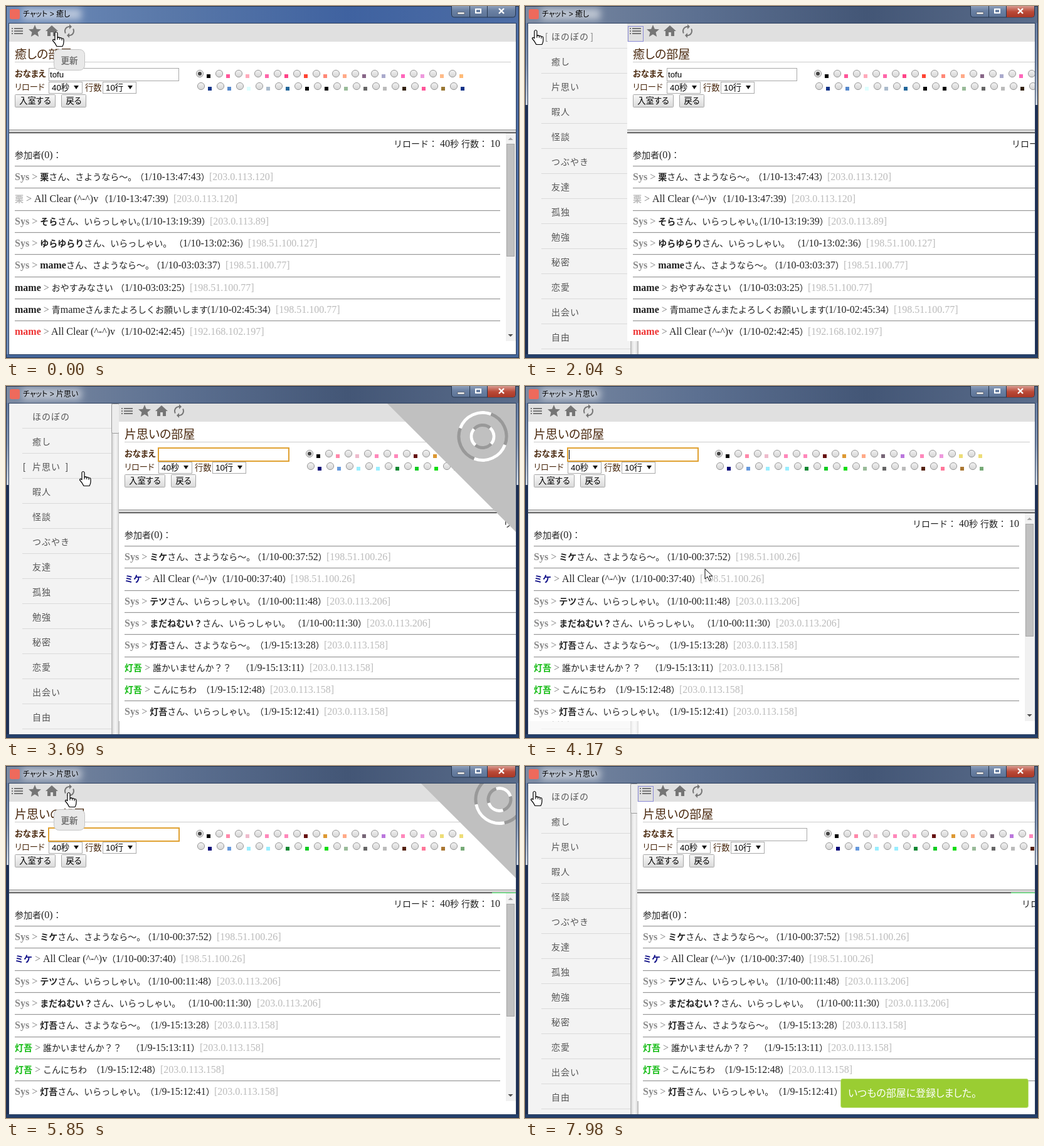
An HTML page for the animation above (8000 ms loop, 818 by 562 pixels).

```html
<!DOCTYPE html>
<html lang="ja">
<head>
<meta charset="utf-8">
<title>チャット</title>
<style>
html, body { margin: 0; width: 100%; height: 100%; overflow: hidden; background: #fff; }
svg { display: block; width: 818px; height: 562px; }
text { white-space: pre; font: 13.3px 'Liberation Sans', 'Noto Sans CJK JP', 'Noto Sans CJK', sans-serif; font-feature-settings: "palt"; }
.log text { font: 16px 'Liberation Serif', 'Noto Sans CJK JP', 'Noto Sans CJK', serif; fill: #222; }
.b { font-weight: bold; }
.side text { font-size: 14px; letter-spacing: 1px; fill: #555; font-feature-settings: normal; }
.tip text { font-weight: bold; font-size: 13.5px; fill: #777; text-anchor: middle; }
</style>
</head>
<body>
<svg id="stage" viewBox="0 0 818 562"></svg>
<script>
const LOOP = 8000, OPEN = 175;
const rooms = ['ほのぼの', '癒し', '片思い', '暇人', '怪談', 'つぶやき', '友達', '孤独', '勉強', '秘密', '恋愛', '出会い', '自由'];
const bye = 'さん、さようなら～。', hello = 'さん、いらっしゃい。', clear = 'All Clear (^-^)v';

// speaker (empty = system), speaker colour, greeted name, text, time, address, address x
const pages = [
  { room: '癒し', name: 'tofu',
    colors: ['000 f59 fab f6a f48 f43 f87 fa8 868 aac f6b e9d fb8 fb7', '138 58c dff abc 269 000 000 9b9 666 bbb 321 f59 973 138'],
    log: [
      ['', '', '栗', bye, '1/10-13:47:43', '203.0.113.120', 324],
      ['栗', '#bbb', '', clear, '1/10-13:47:39', '203.0.113.120', 267],
      ['', '', 'そら', hello, '1/10-13:19:39', '203.0.113.89', 325],
      ['', '', 'ゆらゆらり', hello, '1/10-13:02:36', '198.51.100.127', 386],
      ['', '', 'mame', bye, '1/10-03:03:37', '198.51.100.77', 350],
      ['mame', '#222', '', 'おやすみなさい', '1/10-03:03:25', '198.51.100.77', 293],
      ['mame', '#222', '', '青mameさんまたよろしくお願いします', '1/10-02:45:34', '198.51.100.77', 430],
      ['mame', '#e33', '', clear, '1/10-02:42:45', '192.168.102.197', 293]] },
  { room: '片思い', name: '',
    colors: ['000 f8a ebc f8b f8b 611 d93 fa8 767 b7d f8b e9d ed7 ed7', '007 69d 9ef 9ef 183 1c2 1d1 9b9 666 bbb 521 f79 a73 7a7'],
    log: [
      ['', '', 'ミケ', bye, '1/10-00:37:52', '198.51.100.26', 336],
      ['ミケ', '#118', '', clear, '1/10-00:37:40', '198.51.100.26', 279],
      ['', '', 'テツ', hello, '1/10-00:11:48', '203.0.113.206', 336],
      ['', '', 'まだねむい？', hello, '1/10-00:11:30', '203.0.113.206', 400],
      ['', '', '灯吾', bye, '1/9-15:13:28', '203.0.113.158', 332],
      ['灯吾', '#1b1', '', '誰かいませんか？？', '1/9-15:13:11', '203.0.113.158', 309],
      ['灯吾', '#1b1', '', 'こんにちわ', '1/9-15:12:48', '203.0.113.158', 246],
      ['', '', '灯吾', hello, '1/9-15:12:41', '203.0.113.158', 332]] }
];

const rect = (x, y, w, h, fill, more = '') => `<rect x="${x}" y="${y}" width="${w}" height="${h}" fill="${fill}" ${more}/>`;
const text = (x, y, s, more = '') => `<text x="${x}" y="${y}" ${more}>${s}</text>`;
const path = (d, more) => `<path d="${d}" ${more}/>`;
// Japanese runs are set smaller than the Latin serif around them
const mixed = s => s.replace(/[^\x00-\x7f]+/g, run => `<tspan font-size="14px">${run}</tspan>`);
const span = (s, fill, bold) => `<tspan fill="${fill}" ${bold ? 'class="b"' : ''}>${mixed(s)}</tspan>`;
const brown = 'fill="#4b2a10"';

const icons = [
  [6, 'M3 13h2v-2H3zm0 4h2v-2H3zm0-8h2V7H3zm4 4h14v-2H7zm0 4h14v-2H7zM7 7v2h14V7z'],
  [34, 'M12 17.27L18.18 21l-1.64-7.03L22 9.24l-7.19-.61L12 2 9.19 8.63 2 9.24l5.46 4.73L5.82 21z'],
  [61, 'M10 20v-6h4v6h5v-8h3L12 3 2 12h3v8z'],
  [89, 'M12 6v3l4-4-4-4v3c-4.42 0-8 3.58-8 8 0 1.57.46 3.03 1.24 4.26L6.7 14.8c-.45-.83-.7-1.79-.7-2.8 0-3.31 2.69-6 6-6zm6.76 1.74L17.3 9.2c.44.84.7 1.79.7 2.8 0 3.31-2.69 6-6 6v-3l-4 4 4 4v-3c4.42 0 8-3.58 8-8 0-1.57-.46-3.03-1.24-4.26z']
];

function select(x, label) {
  return rect(x + .5, 121.5, 53, 18, '#fff', 'stroke="#aaa"') + text(x + 5, 135, label) +
    path(`M${x + 40} 127h8l-4 6z`, 'fill="#111"');
}
function button(x, w, label) {
  return rect(x + .5, 141.5, w, 20, 'url(#btn)', 'stroke="#a5a5a5" rx="1"') +
    text(x + w / 2 + .5, 156, label, 'text-anchor="middle"');
}
function radios(row, list) {
  return list.split(' ').map((c, i) => {
    const x = 309 + row * 2 + i * 31, y = 108 + row * 20;
    return `<circle cx="${x}" cy="${y}" r="5.6" fill="url(#radio)" stroke="#999"/>` +
      (row + i ? '' : `<circle cx="${x}" cy="${y}" r="3" fill="#444"/>`) + rect(x + 11, y + 1, 6, 6, '#' + c);
  }).join('');
}
function message([who, color, name, body, time, ip, x], i) {
  const hr = Math.round(255 + i * 35.33), y = hr + 22.5, start = x - (time.length > 12 ? 104 : 96);
  return rect(14, hr, 774, 1, '#999') + rect(14, hr + 1, 774, 1, '#e9e9e9') +
    text(14, y, span(who || 'Sys', color || '#888', true) + span(' &gt; ', '#777') + span(name, '#222', true) + mixed(body)) +
    text(start, y, mixed('（'), 'text-anchor="end"') + text(start, y, mixed(time + '）')) +
    text(x, y, `[${ip}]`, 'style="fill:#bbb"');
}
function page(p, i) {
  return `<g id="page${i}">` + text(14, 84, p.room + 'の部屋', `${brown} style="font-size:19px;font-weight:500"`) +
    text(70, 114, p.name) + radios(0, p.colors[0]) + radios(1, p.colors[1]) +
    `<g class="log">${p.log.map(message).join('')}</g></g>`;
}
function tip(id, x, w, label) {
  return `<g id="${id}" class="tip">` + rect(x, 69.5, w, 33, '#e9e9e9', 'rx="8" stroke="#c4c4c4"') +
    text(x + w / 2, 91.5, label) + '</g>';
}
function ring(id, r, w) {
  const q = r * Math.PI / 2;
  return `<g id="${id}" fill="none" stroke-width="${w}"><circle r="${r}" stroke="#999"/>` +
    `<circle r="${r}" stroke="#fff" stroke-dasharray="${q} ${q}"/></g>`;
}
function gradient(id, dir, ...stops) {
  return `<linearGradient id="${id}" x1="0" y1="0" x2="${dir ? 0 : 1}" y2="${dir}">` +
    stops.map((c, i) => `<stop offset="${i / (stops.length - 1)}" stop-color="${c}"/>`).join('') + '</linearGradient>';
}
const edge = x => rect(x, 27, 5, 131, 'url(#haze)') + rect(x, 158, 5, 404, '#1d2f55');
function chrome(id, active) {
  return `<g id="${id}">` + rect(0, 0, 818, 562, active ? 'url(#aero2)' : 'url(#aero1)') +
    (active ? edge(0) + edge(813) : '') +
    rect(0, 556, 818, 6, active ? '#24406c' : '#45679b') +
    rect(.5, .5, 817, 561, 'none', 'stroke="#22324e"') + rect(4.5, 27.5, 809, 529, 'none', 'stroke="#2d405f"') +
    rect(710.5, -4, 102, 22, 'url(#glass)', 'rx="4" stroke="#26374f"') +
    (active ? path('M767 0h45v14q0 4-4 4h-41z', 'fill="url(#close)"') : '') +
    path('M739.5 0v18M767.5 0v18', 'stroke="#26374f"') + '</g>';
}

const scrollArrow = (y, d, fill) => path(`M800.5 ${y}h8l-4 ${d}z`, `fill="${fill}"`);

stage.innerHTML = `<defs>
${gradient('aero1', 0, '#6f8cb8', '#5877a8', '#3f62a0', '#4d6da5')}
${gradient('aero2', 0, '#7c8ba3', '#5c7091', '#435676', '#5a6c8a')}
${gradient('haze', 1, '#667da2', '#8598b6', '#cdd6e2')}
${gradient('glass', 1, '#a3b2c8', '#6c82a4', '#5b7296')}
${gradient('close', 1, '#d79a90', '#bb4a38', '#a83826')}
${gradient('btn', 1, '#f8f8f8', '#dadada')}
${gradient('radio', 1, '#f2f2f2', '#d4d4d4')}
${gradient('track', 0, '#b4b4b4', '#e8e8e8', '#f4f4f4', '#e8e8e8', '#b0b0b0')}
<clipPath id="view">${rect(5, 28, 808, 528, '#fff')}</clipPath>
<filter id="soft" x="-20%" y="-100%" width="140%" height="300%"><feGaussianBlur stdDeviation="6"/></filter>
</defs>
${chrome('idle', false)}${chrome('active', true)}
${rect(26, 4, 94, 18, '#fff', 'opacity=".55" filter="url(#soft)"')}
${rect(6, 5, 16, 16, '#ee6a5c', 'rx="3"')}
<text id="caption" x="27" y="17" style="font-size:12px"></text>
${rect(720, 10, 11, 3, '#fff', 'stroke="#444" stroke-width=".6"')}
${rect(749, 5, 8, 6, 'none', 'stroke="#fff" stroke-width="2"')}
${path('M786 4l8 8m0-8l-8 8', 'stroke="#fff" stroke-width="2.4"')}
<g clip-path="url(#view)">
  ${rect(5, 28, 808, 528, '#fff')}
  <g id="side" class="side">
    ${rect(5, 28, 164, 528, '#f3f3f3')}
    ${rooms.map((r, i) => text(42, 53.5 + i * 40, r) + rect(26, 67 + i * 40, 142, 1, '#dadada')).join('')}
    <text id="left">[</text><text id="right">]</text>
    ${rect(168, 28, 13, 528, 'url(#track)')}${rect(168.5, 28.5, 12, 47, '#ededed', 'rx="2" stroke="#999"')}
  </g>
  <g id="main">
    ${rect(5, 28, 808, 507, '#fff')}${rect(5, 28, 808, 29, '#e0e0e0')}
    ${icons.map(([x, d]) => path(d, `transform="translate(${x} 28)" fill="#757575"`)).join('')}
    ${rect(6.5, 32.5, 24, 24, 'none', 'id="dots" stroke="#33c" stroke-dasharray="1 1"')}
    ${rect(14, 89, 791, 1, '#ccc')}
    ${text(14, 113, 'おなまえ', brown + ' class="b"')}
    ${rect(68.5, 99.5, 207, 20, '#fff', 'stroke="#a9a9a9"')}
    ${rect(68, 99, 208, 21, 'none', 'id="focus" stroke="#e0a132" stroke-width="2"')}
    ${rect(70, 102, 1, 15, '#000', 'id="caret"')}
    ${text(14, 134, 'リロード', brown)}${select(68, '40秒')}
    ${text(126, 135, '行数', brown)}${select(154, '10行')}
    ${button(14, 64, '入室する')}${button(88, 39, '戻る')}
    ${rect(5, 197, 808, 5, '#d2d2d2')}${rect(5, 197, 808, 1, '#aaa')}${rect(5, 202, 808, 1, '#000')}
    <g class="log">${text(788, 225, mixed('リロード： 40秒 行数： 10'), 'text-anchor="end"')}${text(14, 243, mixed('参加者(0)：'))}</g>
    ${pages.map(page).join('')}
    ${rect(797, 203, 16, 332, '#f1f1f1')}${rect(798.5, 220.5, 12, 179, '#c1c1c1', 'stroke="#a8a8a8"')}
    ${scrollArrow(214, -4, '#a3a3a3')}${scrollArrow(524, 4, '#505050')}
  </g>
  ${rect(775, 202, 38, 1, '#2c4', 'id="bar"')}
  ${tip('tipReload', 76.5, 49, '更新')}${tip('tipStar', 6.5, 119, 'お気に入り登録')}
  <g id="loader">${path('M608 28H813V233z', 'fill="#c0c0c0"')}
    <g transform="translate(760 80.5)">${ring('outer', 38, 5)}${ring('inner', 18, 5)}</g></g>
  <g id="toast">${rect(487.5, 499.5, 299, 46, '#9acd32', 'rx="3" stroke="#c3e285"')}
    ${text(499, 528, 'いつもの部屋に登録しました。', 'fill="#fff" style="font-size:16px"')}</g>
</g>
<g id="hand">${path('M-2 0Q0-3 2 0V8Q4 6 6 8 8 7 9 9 12 8 12 11V15Q12 18 10 21.500H1Q-1 17-5.500 12-5 9-2 11.500z', 'fill="#fff" stroke="#000" stroke-width="1.2" stroke-linejoin="round"')}
  ${path('M2 8v3M5.700 8v3M9 9v3', 'stroke="#000"')}</g>
<g id="arrow">${path('M0 0V16L4 12.500 7 19 9.500 18 6.800 11.500H12z', 'fill="#fff" stroke="#000"')}</g>`;

const el = {};
stage.querySelectorAll('[id]').forEach(e => el[e.id] = e);

const ramp = (t, from, len) => Math.min(1, Math.max(0, (t - from) / len));
const smooth = p => p * p * (3 - 2 * p);
const out = p => 1 - (1 - p) ** 2;
const within = (t, a, b) => t >= a && t < b;
const show = (e, v) => { e.style.opacity = +v; };
const move = (e, x, y) => e.setAttribute('transform', `translate(${x} ${y})`);
const pulse = (t, inAt, inLen, outAt, outLen) => ramp(t, inAt, inLen) - ramp(t, outAt, outLen);

// start, end, then the pointer tip at the end of the move
const moves = [[0, 0, 80, 43], [30, 700, 53, 45], [1260, 1620, 17, 40], [2370, 2880, 123, 138],
  [3700, 3900, 287, 292], [4250, 4770, 100, 44], [6060, 6500, 53, 45], [7150, 7590, 15, 42]];
const hovers = [[1900, 2480, 0], [2480, 2640, 1], [2640, 3760, 2]];

function pointer(t) {
  let x = 0, y = 0;
  for (const [a, b, tx, ty] of moves) {
    const p = a === b ? 1 : smooth(ramp(t, a, b - a));
    x += (tx - x) * p;
    y += (ty - y) * p;
  }
  return [x, y];
}

function draw(t) {
  const shift = Math.round(OPEN * (out(ramp(t, 1835, 300)) - out(ramp(t, 3860, 300)) + out(ramp(t, 7700, 300))));
  move(el.main, shift, 0);
  show(el.side, t < 1835 ? 0 : t < 7700 ? 1 - ramp(t, 4020, 260) : 1);

  const awake = t >= 1700;
  show(el.idle, !awake);
  show(el.active, awake);
  el.caption.textContent = 'チャット > ' + pages[+(t >= 3000)].room;
  const second = t >= 3350;
  show(el.page0, !second);
  show(el.page1, second);
  const focused = second && t < 6650;
  show(el.focus, focused);
  show(el.caret, focused && (t - 4100 + 10600) % 1060 < 530);
  show(el.dots, within(t, 1700, 2900) || t >= 7700);
  show(el.bar, t >= 5600);

  const hover = hovers.find(([a, b]) => within(t, a, b));
  show(el.left, 0);
  show(el.right, 0);
  if (hover) {
    const [from, , row] = hover, p = ramp(t, from, 300), y = 53.5 + row * 40, gap = 3 + 10 * p;
    move(el.left, 40 - gap, y);
    move(el.right, 41 + rooms[row].length * 15 + gap - 4, y);
    show(el.left, .3 + .7 * p);
    show(el.right, .3 + .7 * p);
  }

  show(el.tipReload, 1 - ramp(t, 60, 260) + pulse(t, 4800, 300, 6100, 260));
  show(el.tipStar, pulse(t, 720, 360, 1290, 260) + pulse(t, 6500, 300, 7200, 300));

  const loading = t < 4600 ? smooth(ramp(t, 2990, 220)) - smooth(ramp(t, 3750, 220))
    : smooth(ramp(t, 5290, 220)) - smooth(ramp(t, 5780, 220));
  const away = 110 * (1 - loading);
  move(el.loader, away, -away);
  show(el.loader, loading > 0);
  el.outer.setAttribute('transform', `rotate(${(t - 3690) * .36 + 200})`);
  el.inner.setAttribute('transform', `rotate(${(3690 - t) * .36 + 130})`);

  show(el.toast, ramp(t, 6650, 300));
  move(el.toast, t >= 7700 ? 16 : 0, 0);

  const [x, y] = pointer(t).map(Math.round), plain = x > 181 && y > 57;
  move(el.hand, x, y);
  move(el.arrow, x, y);
  show(el.hand, !plain);
  show(el.arrow, plain);
}

const began = performance.now();
function tick() {
  draw((performance.now() - began) % LOOP);
  requestAnimationFrame(tick);
}
tick();
</script>
</body>
</html>
```
